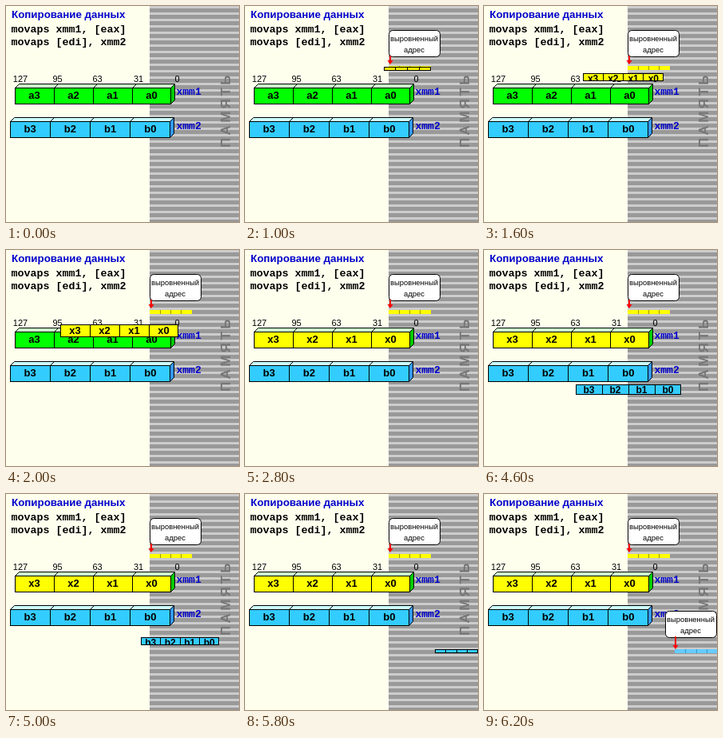
An HTML page that plays this animation: 292x270 px, repeating every 9200 ms.

```html
<!DOCTYPE html>
<html lang="ru">
<head>
<meta charset="utf-8">
<title>movaps</title>
<style>
  html, body { margin: 0; width: 100%; height: 100%; overflow: hidden; background: #ffffee; }
  #stage { display: block; width: 292px; height: 270px; }
  text { font-family: "Liberation Sans", Arial, sans-serif; }
  .title { font-size: 13.33px; font-weight: bold; fill: #0000cc; }
  .code, .reg { font: bold 13.33px "Liberation Mono", "Courier New", monospace; white-space: pre; }
  .reg { font-size: 13px; fill: #0000cc; }
  .bit { font-size: 11px; text-anchor: middle; }
  .cell { font-size: 13px; font-weight: bold; text-anchor: middle; }
  .note { font-size: 9.4px; text-anchor: middle; }
  .memory { font-size: 17px; font-weight: bold; letter-spacing: 3.4px; fill: #777; }
</style>
</head>
<body>
<svg id="stage" viewBox="0 0 292 270">
  <defs>
    <pattern id="stripes" width="8" height="8" patternUnits="userSpaceOnUse">
      <rect width="8" height="8" fill="#999999"/>
      <rect width="8" height="3" fill="#cccccc"/>
    </pattern>
  </defs>
  <rect width="292" height="270" fill="#ffffee"/>
  <rect x="180" width="112" height="270" fill="url(#stripes)"/>
  <text class="memory" transform="translate(281 177) rotate(-90)">ПАМЯТЬ</text>
  <text class="title" x="7" y="15">Копирование данных</text>
  <text class="code" x="6.5" y="33">movaps xmm1, [eax]</text>
  <text class="code" x="6.5" y="49">movaps [edi], xmm2</text>
</svg>
<script>
const LOOP = 9200;
const YELLOW = '#ffff00', BLUE = '#33ccff', PALE_BLUE = '#66ccff';
const stage = document.getElementById('stage');
const sheet = document.head.appendChild(document.createElement('style'));
let count = 0;

function add(parent, tag, attrs, content = '') {
  const el = document.createElementNS('http://www.w3.org/2000/svg', tag);
  for (const key in attrs) el.setAttribute(key, attrs[key]);
  el.textContent = content;
  return parent.appendChild(el);
}

const label = (parent, cls, x, y, content) => add(parent, 'text', { class: cls, x, y }, content);

// Group that is visible only from one time to another.
function during(from, to = LOOP) {
  const name = 'show' + count++;
  const pct = t => (t / LOOP * 100).toFixed(4) + '%';
  sheet.textContent += `@keyframes ${name} { 0% { opacity: 0 } ${pct(from)} { opacity: 1 }
    ${pct(to)} { opacity: ${to < LOOP ? 0 : 1} } 100% { opacity: 0 } }
    .${name} { opacity: 0; animation: ${name} ${LOOP}ms step-end infinite }\n`;
  return add(stage, 'g', { class: name });
}

const divider = (i, w) => Math.floor(i * w / 4) + .5;

// Row of four cells; the labels are cut off at its edges.
function row(parent, [x, y, right, bottom], fill, letter, line = '#000', outline = line) {
  const w = right - x, h = bottom - y;
  const box = add(parent, 'svg', { x, y, width: w, height: h, overflow: 'hidden' });
  add(box, 'rect', { x: .5, y: .5, width: w - 1, height: h - 1, fill, stroke: outline });
  for (let i = 0; i < 4; i++) {
    if (i) add(box, 'path', { d: `M${divider(i, w)} 0V${h}`, stroke: line });
    if (letter && h > 7) {
      const text = label(box, 'cell', (i + .5) * w / 4, Math.max(h / 2 + 3.5, 11), letter + (3 - i));
      if (w < 140) text.style.fontSize = '12px';
    }
  }
}

function register(box, fill, top, side, letter, name, nameY) {
  const [x, y, right, bottom] = box;
  const x0 = x + .5, x1 = right - .5, y0 = y + .5, y1 = bottom - .5;
  add(stage, 'path', { d: `M${x0} ${y0}l5-5H${x1 + 5}l-5 5z`, fill: top, stroke: '#000' });
  add(stage, 'path', { d: `M${x1} ${y0}l5-5V${y1 - 5}l-5 5z`, fill: side, stroke: '#000' });
  for (let i = 1; i < 4; i++) {
    add(stage, 'path', { d: `M${x + divider(i, right - x)} ${y0}l5-5`, stroke: '#000' });
  }
  row(stage, box, fill, letter);
  label(stage, 'reg', 213.5, nameY, name);
}

function callout(parent, x, y, tipX, tipY) {
  add(parent, 'rect', { x: x + .5, y: y + .5, width: 64, height: 33, rx: 5, fill: '#fff', stroke: '#000' });
  label(parent, 'note', x + 32, y + 14, 'выровненный');
  label(parent, 'note', x + 32, y + 28, 'адрес');
  add(parent, 'path', { d: `M${tipX} ${y + 32}V${tipY - 4}`, stroke: '#f00', 'stroke-width': 2 });
  add(parent, 'path', { d: `M${tipX - 3.5} ${tipY - 5}h7l-3.5 5z`, fill: '#f00' });
}

// Each step: start time, then left, top, right, bottom.
function travel(steps, end, fill, letter) {
  steps.forEach(([from, ...box], i) => {
    const to = i + 1 < steps.length ? steps[i + 1][0] : end;
    row(during(from, to), box, fill, letter);
  });
}

[[127, 18], [95, 64.5], [63, 114.5], [31, 166], [0, 214.5]]
  .forEach(([bit, x]) => label(stage, 'bit', x, 95, bit));

register([11, 102, 207, 123], '#00ff00', '#ccffcc', '#00cc00', 'a', 'xmm1', 111);
register([5, 144, 206, 165], BLUE, '#ccffff', '#3399ff', 'b', 'xmm2', 154);

const load = during(400);
row(load, [180, 75, 233, 80], YELLOW, '', '#999900', YELLOW);
callout(load, 180, 30, 182, 73);

travel([
  [1000, 174, 76, 233, 81],
  [1300, 157, 80, 231, 88],
  [1600, 124, 84, 225, 94],
  [2000, 68, 93, 216, 109],
  [2400, 23, 102, 209, 120],
  [2800, 11, 102, 207, 123]
], LOOP, YELLOW, 'x');

travel([
  [3800, 36, 151, 218, 170],
  [4200, 83, 161, 235, 177],
  [4600, 115, 168, 247, 181],
  [5000, 169, 179, 267, 189],
  [5400, 216, 189, 284, 196],
  [5800, 238, 194, 292, 199]
], 6200, BLUE, 'b');

const store = during(6200);
row(store, [239, 194, 293, 199], PALE_BLUE, '', '#3399cc', PALE_BLUE);
callout(store, 227, 146, 240, 194);
</script>
</body>
</html>
```
